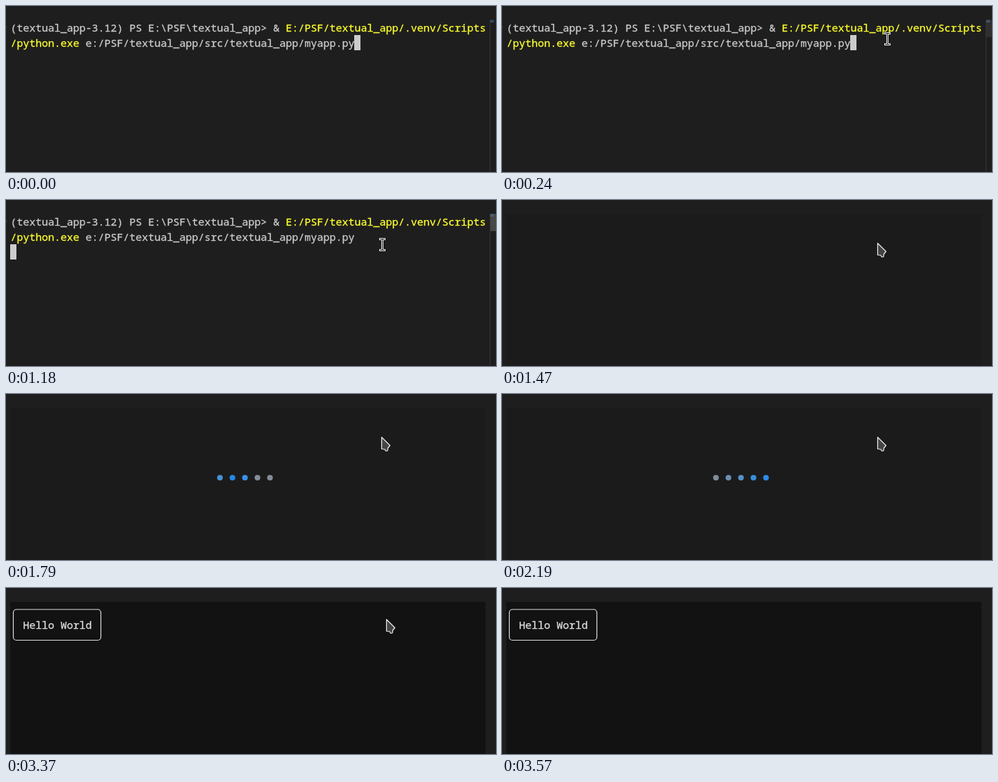
Animation, 705 px wide and 240 px high, one loop 4.14 s. Source, as an HTML page with a canvas:

```html
<!DOCTYPE html>
<html lang="en">
<head>
<meta charset="utf-8">
<title>Terminal app start</title>
<style>
html, body { margin: 0; width: 100%; height: 100%; overflow: hidden; background: #1e1e1e; }
canvas { display: block; }
</style>
</head>
<body>
<canvas id="stage" width="705" height="240"></canvas>
<script>
const ctx = document.getElementById('stage').getContext('2d');
const LOOP = 4140, CELL = 9, ROW = 22, LEFT = 6, TOP = 20;
const GREY = '#cccccc', YELLOW = '#ffff2e';
const ENTER = 40, STILL = 480, RUN = 1180, CLEAR = 1470, DOTS = 1520;
const READY = 2470, LEAVE = 3370, GONE = 3570;
const STEPS = 8;

// Colour stops of the loading pulse: position, red, green, blue
const PULSE = [
  [0, 61, 143, 234], [0.13, 32, 136, 228], [0.26, 72, 146, 212],
  [0.6, 131, 140, 152], [0.92, 131, 140, 152], [1, 61, 143, 234]
];

function rect(x, y, w, h, color) {
  ctx.fillStyle = color;
  ctx.fillRect(x, y, w, h);
}

// A hairline stroke gives the glyphs their slightly heavier weight
function text(str, col, row, color) {
  const x = LEFT + col * CELL + 0.5, y = TOP + row * ROW + 17;
  ctx.font = '15px "Noto Sans Mono", "DejaVu Sans Mono", monospace';
  ctx.fillStyle = ctx.strokeStyle = color;
  ctx.lineWidth = 0.3;
  ctx.lineJoin = 'round';
  ctx.fillText(str, x, y);
  ctx.strokeText(str, x, y);
}

function polygon(points) {
  ctx.beginPath();
  points.forEach(([x, y]) => ctx.lineTo(x, y));
  ctx.closePath();
}

// Light I-beam with a dark core
function beam(x, y) {
  const light = '#f0f0f0', dark = '#1a1a1a';
  rect(x - 4, y - 9, 9, 3, light);
  rect(x - 4, y + 7, 9, 3, light);
  rect(x - 1, y - 7, 3, 15, light);
  rect(x - 3, y - 8, 7, 1, dark);
  rect(x - 3, y + 8, 7, 1, dark);
  rect(x, y - 8, 1, 17, dark);
}

function arrow(x, y) {
  ctx.save();
  ctx.translate(x + 0.5, y + 0.5);
  polygon([[0, 0], [0, 17], [4.5, 17.5], [6, 20], [8.5, 19.5], [9, 15.5], [12, 12]]);
  ctx.fillStyle = '#444444';
  ctx.strokeStyle = '#f2f2f2';
  ctx.lineWidth = 1.2;
  ctx.lineJoin = 'round';
  ctx.fill();
  ctx.stroke();
  ctx.restore();
}

function shell(t) {
  text('(textual_app-3.12) PS E:\\PSF\\textual_app> &', 0, 0, GREY);
  text('E:/PSF/textual_app/.venv/Scripts', 44, 0, YELLOW);
  text('/python.exe', 0, 1, YELLOW);
  text('e:/PSF/textual_app/src/textual_app/myapp.py', 12, 1, GREY);
  if (t < RUN) rect(501, 42, CELL, ROW, GREY);
  else rect(LEFT, 64, CELL, ROW, GREY);

  rect(0, 29, 1, 4, '#3c3c3c');
  rect(696, 20, 1, 220, '#363636');
  rect(697, 20, 5, 4, '#2f4a63');
  if (t < ENTER) return;

  const gap = (STILL - ENTER) / (STEPS - 1);
  const p = Math.min(1, Math.floor((t - ENTER) / gap + 0.01) / (STEPS - 1));
  rect(697, 20, 8, 25, `rgba(121,121,121,${0.45 * p})`);
  const ease = 1 - (1 - p) ** 2;
  const dip = 7 * Math.sin(Math.PI * p) * p;
  beam(Math.round(582 - 41 * ease), Math.round(2 + 62 * ease + dip));
}

function pulseColor(v) {
  const i = PULSE.findIndex(stop => stop[0] >= v);
  const a = PULSE[Math.max(0, i - 1)], b = PULSE[i];
  const f = b === a ? 0 : (v - a[0]) / (b[0] - a[0]);
  const rgb = [1, 2, 3].map(k => Math.round(a[k] + (b[k] - a[k]) * f));
  return `rgb(${rgb})`;
}

function loading(t) {
  rect(LEFT, TOP, 684, 220, '#1b1b1b');
  if (t >= DOTS) {
    for (let i = 0; i < 5; i++) {
      const v = (t - CLEAR) / 1000 * 0.8 - i / 8;
      ctx.fillStyle = pulseColor(v - Math.floor(v));
      ctx.beginPath();
      ctx.arc(307.8 + i * 18, 121, 4.1, 0, Math.PI * 2);
      ctx.fill();
    }
  }
  arrow(540, 62);
}

function hello(t) {
  rect(LEFT, TOP, 684, 220, '#121212');
  ctx.strokeStyle = '#e0e0e0';
  ctx.lineWidth = 1.2;
  ctx.beginPath();
  ctx.roundRect(10.5, 31, 126, 44.5, 4.5);
  ctx.stroke();
  text('Hello World', 2, 1, '#e0e0e0');
  if (t < LEAVE) arrow(540, 62);
  else if (t < GONE) {
    const k = Math.floor((t - LEAVE) / 40);
    arrow(Math.round(547 + 5.5 * k), Math.round(45 - 12.5 * k));
  }
}

function draw(t) {
  rect(0, 0, 705, 240, '#1e1e1e');
  if (t < CLEAR) shell(t);
  else if (t < READY) loading(t);
  else hello(t);
}

const start = performance.now();
function tick() {
  draw((performance.now() - start) % LOOP);
  requestAnimationFrame(tick);
}
tick();
</script>
</body>
</html>
```
